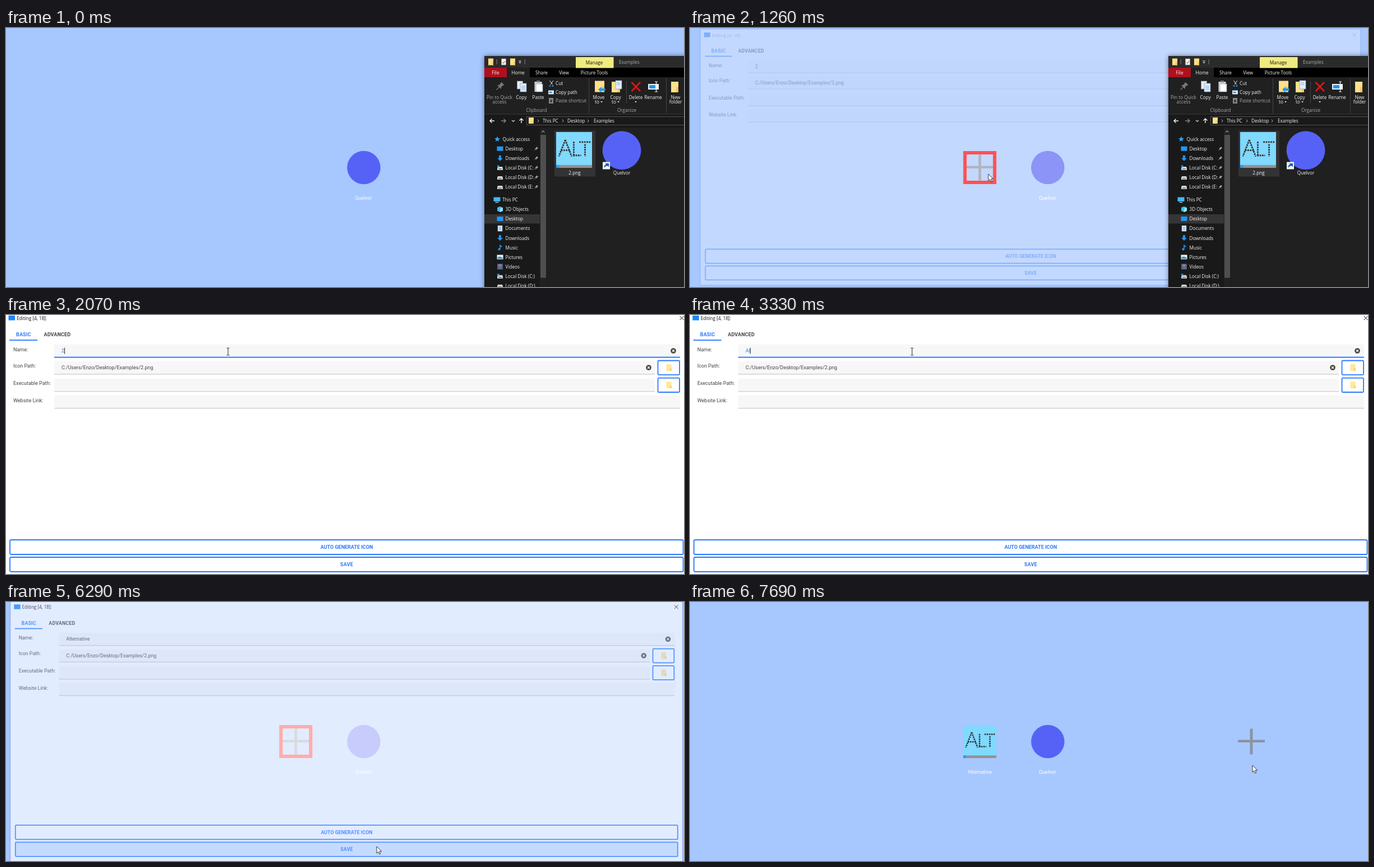
An HTML page that plays this animation: 1209x463 px, repeating every 8000 ms.

```html
<!DOCTYPE html>
<html lang="en">
<head>
<meta charset="utf-8">
<title>Add an icon</title>
<style>
html, body { margin: 0; width: 100%; height: 100%; overflow: hidden; background: #a7c7ff; }
svg { display: block; }
text { font: 9px Roboto, sans-serif; fill: #444; white-space: pre; }
.ui { font: 8.2px "Open Sans", sans-serif; fill: #f4f4f4; }
.dim { fill: #aaa; }
.black { fill: #111; }
.white { fill: #fff; }
.bold { font-weight: 700; }
.blue { fill: #2979ff; }
.mid { text-anchor: middle; }
.frame { fill: none; stroke: #2979ff; stroke-width: 1.8; }
.line { fill: none; stroke: #f4f4f4; stroke-width: 1.2; }
#explorer { filter: drop-shadow(0 0 4px #0007); }
</style>
</head>
<body>
<svg id="stage" width="1209" height="463" viewBox="0 0 1209 463"></svg>
<script>
const BLUE = '#2979ff', SKY = '#2296f3', FOLDER = '#ffe08a', APP = 'Quelvor';
const text = (x, y, s, cls = '', attrs = '') =>
  `<text x="${x}" y="${y}" class="${cls}" ${attrs}>${s}</text>`;
const rect = (x, y, w, h, fill, attrs = '') =>
  `<rect x="${x}" y="${y}" width="${w}" height="${h}" fill="${fill}" ${attrs}/>`;
const path = (d, attrs = '') => `<path d="${d}" ${attrs}/>`;
const circle = (x, y, r, fill) => `<circle cx="${x}" cy="${y}" r="${r}" fill="${fill}"/>`;
const group = (id, body, attrs = '') => `<g id="${id}" ${attrs}>${body}</g>`;
const at = (x, y, body, scale = 1) => `<g transform="translate(${x} ${y}) scale(${scale})">${body}</g>`;
const line = (d, color, width = 1.2) => path(d, `class="line" style="stroke:${color};stroke-width:${width}"`);
const ui = (x, y, s, cls = '') => text(x, y, s, 'ui ' + cls);
const uiMid = (x, y, s, cls = '') => ui(x, y, s, 'mid ' + cls);

// 59 px picture with dotted lettering
const picture = (x, y, scale = 1) => at(x, y,
  rect(0, 0, 59, 59, '#80d9ff') + rect(0, 54.3, 59, 4.7, '#929292') + rect(0, 54.3, 5, 4.7, '#2a9bf0') +
  path('M15 13L4.5 40M15 13L25.5 40M8 30H23M29 16V40M28 38.5H41M38 16.5H57M47.5 20V40',
    'fill="none" stroke="#333" stroke-width="2.6" stroke-dasharray="2.6 1.35"'), scale);

const plus = (fill) => path('M-24 -3H-2.4V-23H2.4V-3H24V1.6H2.4V23H-2.4V1.6H-24Z', `fill="${fill}"`);
const redBox = `<rect x="-26.5" y="-26.5" width="53" height="53" fill="none" stroke="#f00" stroke-width="6"/>`;

const desktop = () =>
  circle(638, 249.5, 29.7, '#5662f6') + text(637.5, 307, APP, 'mid white') +
  group('hover', plus('#8b93a0') + group('red', redBox)) +
  group('added', picture(487.3, 220) + text(516.5, 307, 'Alternative', 'mid white'));

const field = (y, right, color = '#cfcfcf') =>
  rect(86, y, right - 86, 23, '#f7f7f7') + rect(86, y + 22.5, right - 86, 1.4, color);
const clear = (x, y) => circle(x, y, 4.8, '#45423c') + line(`M${x - 2} ${y - 2}l4 4m0-4l-4 4`, '#fff', 1.3);
const browse = y => `<rect class="frame" x="1162.5" y="${y}" width="38.5" height="25.4" rx="1.5"/>` +
  rect(1177.5, y + 6.5, 9, 12, '#ffe79a') + rect(1184, y + 14, 3, 4.5, '#ecd67b');
const wide = (y, label, id) =>
  `<rect id="${id}" class="frame" x="7" y="${y}" width="1200.5" height="26" rx="2"/>` +
  text(607.5, y + 16.2, label, 'mid bold blue', id === 'save' ? 'letter-spacing=".15"' : '');

const dialog = () =>
  rect(-2, -5, 1218, 473, '#fff', 'stroke="#3d62a8" stroke-opacity=".12" stroke-width="5"') +
  rect(-2, -5, 1218, 473, '#fff', 'stroke="#4a6fb5" stroke-opacity=".5" stroke-width=".8"') +
  rect(4.5, 1, 11.5, 8.5, '#1988f5') +
  group('title', text(19, 9, 'Editing [4, 18]:', 'ui', 'style="fill:currentColor"') +
    path('M1201.5 2l7 7m0-7l-7 7', 'fill="none" stroke="currentColor"')) +
  text(18, 38, 'BASIC', 'bold blue', 'letter-spacing=".15"') +
  text(67.5, 38, 'ADVANCED', 'bold', 'letter-spacing=".15"') + rect(6, 44, 50, 1.8, BLUE) +
  [['Name:', 65], ['Icon Path:', 93.5], ['Executable Path:', 124.7], ['Website Link:', 156]]
    .map(([s, y]) => text(13, y, s)).join('') +
  field(52.5, 1202) + field(82.5, 1157) + field(113.5, 1157) + field(143.5, 1202) +
  group('focus', rect(-558, 74.6, 1116, 1.9, BLUE)) +
  text(99, 67, '', '', 'id="name"') + rect(0, 58.5, 1, 11, '#222', 'id="caret"') +
  text(99, 97, 'C:/Users/Enzo/Desktop/Examples/2.png') +
  clear(1190, 64) + clear(1146, 94) + browse(81.5) + browse(112.6) +
  wide(402, 'AUTO GENERATE ICON', 'auto') + wide(433, 'SAVE', 'save');

const folder = (x, y, w = 9, h = 12) =>
  rect(x, y, w, h, FOLDER) + rect(x + w * .7, y + h * .5, w * .3, h * .5, '#f0c75c');
const page = (x, y, w, h, fill = '#e4eef8') => rect(x, y, w, h, fill, 'stroke="#7d9db8" stroke-width=".7"');
const pin = (x, y, s, fill) => at(x, y,
  `<g transform="rotate(45)">${path('M-3 -6H3L2 -1L4 2H-4L-2 -1ZM-.6 2H.6V8H-.6Z', `fill="${fill}"`)}</g>`, s);
const drop = (x, y) => path(`M${x - 2} ${y - 1}h4l-2 2.4z`, 'fill="#ddd"');

// Navigation icons, centred on 0,0
const drive = path('M-5 1L-4 -2H4L5 1V4H-5Z', 'fill="#d5d9dc"') + rect(-3, 1.5, 6, 1, '#444');
const icons = {
  star: path('M0 -5L1.4 -1.5L5 -1.2L2.2 1L3 4.6L0 2.6L-3 4.6L-2.2 1L-5 -1.2L-1.4 -1.5Z', 'fill="#36a3f5"'),
  desk: rect(-5.5, -4, 11, 8, SKY),
  down: path('M-2 -5H2V0H5L0 5L-5 0H-2Z', `fill="${SKY}"`),
  system: drive + rect(-5, -4.5, 3.4, 3.4, SKY),
  drive,
  pc: rect(-6, -4.5, 12, 7.5, '#41b8f8') + rect(-3, 4, 6, 1.2, '#cde'),
  cube: path('M0 -5L5 -3V3L0 5L-5 3V-3Z', 'fill="#36c3ee"') + path('M0 -1L5 -3V3L0 5Z', 'fill="#9be6fa"'),
  doc: page(-4, -5, 8, 10) + line('M-2 -2H2M-2 0H2M-2 2H2', '#4b90c0', .8),
  note: line('M0 3V-5Q0 -3 3.5 -1', SKY, 1.6) + circle(-1.6, 3, 2, SKY),
  photo: rect(-5.5, -4, 11, 8, '#e8f4fb') + path('M-4.5 3V0L0 -1L4.5 1V3Z', 'fill="#3f8cc0"'),
  film: rect(-5, -5, 10, 10, '#59616e') + rect(-2.6, -4, 5.2, 3.5, '#8f7fc0') + rect(-2.6, .7, 5.2, 3.5, '#4578b0'),
};
const quick = [['desk', 'Desktop'], ['down', 'Downloads'], ['system', 'Local Disk (C:'],
  ['drive', 'Local Disk (D:'], ['drive', 'Local Disk (E:']];
const places = [['cube', '3D Objects'], ['desk', 'Desktop'], ['doc', 'Documents'], ['down', 'Downloads'],
  ['note', 'Music'], ['photo', 'Pictures'], ['film', 'Videos'], ['system', 'Local Disk (C:)'], ['drive', 'Local Disk (D:)']];
const navItem = (icon, label, y, x = 881) => at(x, y, icons[icon]) + ui(x + 9.5, y + 3.2, label);

const titleBar = () =>
  rect(853, 50, 356, 21, '#2b2b2b') + rect(853, 71, 356, 17, '#000') +
  rect(1016, 52, 67.5, 19.5, '#f0ec80') + rect(853, 71, 40, 17, '#b0101e') + rect(893, 71, 41, 17, '#202020') +
  folder(860, 54.5) + rect(874.5, 56, 1.2, 9, '#777') + page(883.5, 55, 8, 11, '#f5f5f5') +
  line('M885.5 61l1.6 2l3-4', '#c46a35') + folder(899, 54.5) + rect(914, 58.5, 5, 1, '#ddd') +
  drop(916.5, 62) + rect(924.5, 56, 1.2, 9, '#777') +
  uiMid(1049, 65, 'Manage', 'black') + ui(1093, 64, 'Examples', 'dim') +
  [['File', 873], ['Home', 913], ['Share', 955], ['View', 995], ['Picture Tools', 1049]]
    .map(([s, x]) => uiMid(x, 83, s)).join('');

const ribbon = () =>
  rect(853, 88, 356, 66, '#202020') + [1039, 1177].map(x => rect(x, 90, 1, 62, '#444')).join('') +
  rect(1106, 95, 1, 40, '#444') +
  pin(881, 104, 1.15, '#777') +
  page(911.5, 95, 10, 14) + page(917, 99, 11, 15) + line('M919 104h7m-7 3h7m-7 3h7', '#5b9bd0', .8) +
  rect(942.5, 96, 13, 18, '#d0d4d8') + rect(946, 94, 6, 3, '#777') + page(945, 100, 12, 14, '#fff') +
  line('M969.5 94l5 7m1.5-7l-5 7', '#dce6ee', 1) + line('M969 103.5a1 1 0 1 0 2 0a1 1 0 1 0-2 0m5 0a1 1 0 1 0 2 0a1 1 0 1 0-2 0', SKY) +
  rect(967, 111.5, 10, 7, '#d5e8f6') + rect(968.5, 114, 5, 2, '#3383c0') +
  rect(968, 125, 8, 10, '#888') + rect(970, 128, 4, 5, '#444') +
  folder(1050, 94.5, 17, 20) + path('M1056 110l5.5-5v3h7v4h-7v3z', `fill="${SKY}"`) +
  folder(1080, 96, 15, 19) + page(1087, 94, 11, 15) + line('M1089 98h6m-6 3h6', '#5b9bd0', .8) +
  line('M1115.5 97l15.5 16m0-16l-15.5 16', '#e01414', 2.8) +
  rect(1145, 100, 19, 10, '#eef4f8') + rect(1147, 102, 11, 6, SKY) + line('M1157 96h5m-2.5 0v18m-2.5 0h5', '#eee') +
  folder(1186, 96, 13, 19) +
  [['Pin to Quick', 880, 127], ['access', 880, 135]].map(([s, x, y]) => uiMid(x, y, s, 'dim')).join('') +
  [['Copy', 919], ['Paste', 949], ['Move', 1057], ['Copy', 1087], ['Delete', 1123], ['Rename', 1154], ['New', 1194]]
    .map(([s, x]) => uiMid(x, 127, s)).join('') +
  uiMid(1054, 135, 'to') + drop(1062, 132) + uiMid(1084, 135, 'to') + drop(1092, 132) + drop(1123, 132) +
  uiMid(1194, 135, 'folder') +
  ui(980, 102, 'Cut') + ui(980, 118, 'Copy path') + ui(980, 133, 'Paste shortcut', 'dim') +
  uiMid(946, 150, 'Clipboard', 'dim') + uiMid(1107, 150, 'Organize', 'dim');

const addressBar = () =>
  rect(853, 154, 356, 24.5, '#191919') + rect(853, 153.5, 356, 1, '#3a3a3a') +
  line('M871 166h-8m3.5-3.5l-3.5 3.5l3.5 3.5M919 170v-8m-3.5 3.5l3.5-3.5l3.5 3.5', '#f4f4f4', 1.4) +
  line('M883 166h8m-3.5-3.5l3.5 3.5l-3.5 3.5', '#888', 1.4) + line('M902 165l2.5 2.3l2.5-2.3', '#ddd') +
  rect(928.5, 158.5, 290, 15, 'none', 'stroke="#555"') + folder(932, 160, 9, 11) +
  [948, 992, 1037].map(x => line(`M${x} 163.5l2 2.5l-2 2.5`, '#ccc', .9)).join('') +
  ui(957, 169, 'This PC') + ui(1001, 169, 'Desktop') + ui(1048, 169, 'Examples');

const explorer = () =>
  rect(853, 50, 370, 430, '#202020') + titleBar() + ribbon() + addressBar() +
  rect(853, 178.5, 112, 290, '#191919') + rect(853, 333, 99, 16.5, '#353535') +
  navItem('star', 'Quick access', 198.5, 876) +
  quick.map(([i, s], n) => navItem(i, s, 215.7 + 17.1 * n)).join('') +
  rect(941, 208, 11, 84, '#191919') +
  quick.map((_, n) => pin(945.5, 215.7 + 17.1 * n, .55, '#aaa')).join('') +
  navItem('pc', 'This PC', 307, 875.5) +
  places.map(([i, s], n) => navItem(i, s, 324 + 17.1 * n)).join('') +
  rect(952, 179, 12.5, 284, '#212121') + rect(953, 191, 10, 255.5, '#4f4f4f') +
  line('M955 186.5l2.6-2.6l2.6 2.6', '#999') +
  rect(978, 183.5, 73, 82, '#333') + picture(981, 186, 64 / 59) + uiMid(1014, 261.5, '2.png') +
  circle(1098, 218.7, 34.4, '#5662f6') + rect(1064, 239.5, 13, 13, '#f4f4f4') +
  path('M1066.5 250Q1066 245 1070 244L1068.5 242H1075V248.5L1073 246.5Q1069 246 1066.5 250Z', 'fill="#1a5fb4"') +
  uiMid(1098, 261.5, APP);

const pointer = () =>
  group('ghost', picture(-32, -56, 64 / 59), 'opacity=".65"') +
  group('arrow', path('M0 0V12.2L2.8 9.6L4.8 14L6.8 13.1L4.9 8.8H8.8Z', 'fill="#fff" stroke="#222" stroke-width=".9"')) +
  group('beam', path('M-2.5 -6.5H-.7L0 -5.8L.7 -6.5H2.5M0 -5.8V5.8M-2.5 6.5H-.7L0 5.8L.7 6.5H2.5',
    'fill="none" stroke="#222" stroke-width="1"'));

document.getElementById('stage').innerHTML =
  rect(0, 0, 1209, 463, '#a7c7ff') + group('desktop', desktop()) + group('dialog', dialog()) +
  group('explorer', explorer()) + group('pointer', pointer());

const $ = id => document.getElementById(id);
const show = (id, on) => $(id).style.display = on ? '' : 'none';
const move = (id, x, y) => $(id).setAttribute('transform', `translate(${x} ${y})`);
const span = (t, from, to) => Math.min(1, Math.max(0, (t - from) / (to - from)));
const smooth = u => u * u * (3 - 2 * u);
const curve = ([ax, ay], [bx, by], [cx, cy], u) => {
  const v = 1 - u, mix = (a, b, c) => a * v * v + 2 * b * u * v + c * u * u;
  return [mix(ax, bx, cx), mix(ay, by, cy)];
};

// Pointer legs: start time, end time, start, control, end
const legs = [
  [70, 800, [1022, 238], [760, 455], [532, 261]],
  [1540, 1740, [532, 261], [450, 170], [389, 63]],
  [2000, 2070, [389, 63], [393, 64], [396, 65.5]],
  [5170, 5660, [396, 65.5], [790, 200], [661, 437]],
  [6690, 7150, [661, 437], [680, 395], [700, 376]],
  [7290, 7690, [700, 376], [860, 320], [1003, 292]],
];
const keys = [3060, 3330, 3460, 3590, 3790, 3920, 4050, 4250, 4315, 4380, 4640];

function pointerAt(t) {
  const [from, to, a, b, c] = legs.filter(leg => t >= leg[0]).pop() || legs[0];
  return curve(a, b, c, smooth(span(t, from, to)));
}

function draw(t) {
  const [x, y] = pointerAt(t);
  const dragging = t >= 70 && t < 900, active = t >= 1740, closing = t >= 6160, closed = t >= 6430;
  const inField = t >= 1700 && t < 6000 && y < 76;

  show('pointer', t >= 70);
  move('pointer', x, y);
  show('ghost', dragging);
  show('arrow', !inField);
  show('beam', inField);
  show('explorer', !active);

  // Grid cells are 60.5 by 111
  const column = 517 + 60.5 * Math.round((x - 517) / 60.5);
  const row = 249.5 + 111 * Math.floor((y - 218) / 111);
  const pick = dragging || closed;
  move('hover', pick ? column : 516.8, pick ? row : 249.5);
  show('hover', t >= 70 && (!dragging || x < 850));
  show('red', !closed);
  show('added', closed);

  const opened = 1 - (1 - span(t, 1205, 1525)) ** 2;
  const shown = opened - span(t, 6133, 6410) ** 2;
  const scale = .95 + .05 * shown;
  show('dialog', shown > 0);
  $('dialog').style.opacity = shown;
  $('dialog').setAttribute('transform', `translate(607 209) scale(${scale}) translate(-607 -209)`);
  $('title').style.color = active ? '#111' : '#999';

  const typed = keys.filter(k => t >= k).length;
  const name = $('name');
  name.textContent = t < 2460 ? '2' : 'Alternative'.slice(0, typed);
  const focused = active && !closing;
  name.style.fill = focused ? BLUE : '#444';
  show('focus', focused);
  $('focus').setAttribute('transform', `translate(644 0) scale(${smooth(span(t, 1690, 1930))} 1)`);
  show('caret', focused && !(t >= 2460 && t < 2530) && !(t >= 5170 && t < 5640));
  $('caret').setAttribute('x', 99 + (name.textContent ? name.getComputedTextLength() : 0));
  $('save').style.fill = closing ? '#2979ff33' : 'none';
}

const start = performance.now();
function tick() {
  draw((performance.now() - start) % 8000);
  requestAnimationFrame(tick);
}
tick();
</script>
</body>
</html>
```
